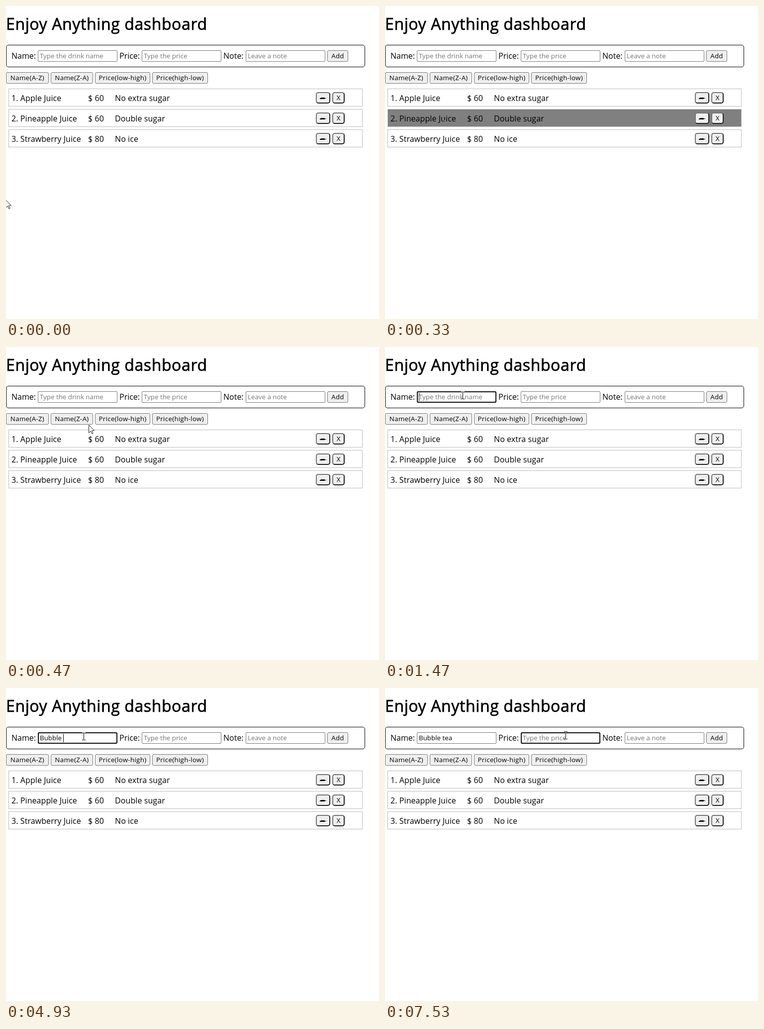
These frames come from a looping animation (750x629 px, 8000 ms). An HTML page:

```html
<!DOCTYPE html>
<html lang="en">
<head>
<meta charset="utf-8">
<title>Drinks list</title>
<style>
  * { box-sizing: border-box; }
  html, body { margin: 0; width: 100%; height: 100%; overflow: hidden; background: #fff; }
  body { position: relative; font: 16px/20px "Open Sans", "Noto Sans", sans-serif; color: #000; cursor: none; }
  body * { position: absolute; white-space: pre; }
  h1 { left: 0; top: 16px; margin: 0; font-size: 32px; line-height: 40px; font-weight: 400; letter-spacing: .6px; -webkit-text-stroke: .7px #000; }
  .form { left: 0; top: 78px; width: 722px; height: 45px; border: 1px solid #000; border-radius: 5px; }
  .label { top: 90px; }
  .field, .btn { height: 23px; font-size: 13.333px; line-height: 21px; border: 1px solid #767676; }
  .field { top: 89px; width: 160px; padding-left: 3px; border-radius: 2px; }
  .field.empty { color: #757575; }
  .field.focus::after { content: ""; position: absolute; inset: -1px; border: 2px solid #101010; border-radius: 3px; }
  .btn { background: #efefef; border-radius: 3px; text-align: center; letter-spacing: .3px; }
  .sort { top: 133px; }
  .row { left: 5px; width: 712px; height: 36px; border: 1px solid #bbb; }
  .row.hover { background: #808080; }
  .row span { top: 8px; letter-spacing: .08px; }
  .row .btn { top: 6px; line-height: 19px; border: 2px solid; border-color: #767676 #212121 #212121 #767676; border-radius: 5px; letter-spacing: 0; }
  .row svg { left: 6px; top: 7px; }
  #caret { top: 92px; width: 1px; height: 17px; background: #000; }
  #arrow, #beam { left: 0; top: 0; overflow: visible; }
  #beam { mix-blend-mode: difference; }
</style>
</head>
<body>
<h1>Enjoy Anything dashboard</h1>
<div class="form"></div>
<span class="label" style="left:11px">Name:</span>
<div class="field" id="name" style="left:64px"></div>
<span class="label" style="left:228px">Price:</span>
<div class="field empty" id="price" style="left:273px">Type the price</div>
<span class="label" style="left:437px">Note:</span>
<div class="field empty" style="left:482px">Leave a note</div>
<div class="btn" style="left:646px;top:89px;width:42px">Add</div>
<div class="btn sort" style="left:0;width:86px">Name(A-Z)</div>
<div class="btn sort" style="left:90px;width:85px">Name(Z-A)</div>
<div class="btn sort" style="left:179px;width:111px">Price(low-high)</div>
<div class="btn sort" style="left:294px;width:112px">Price(high-low)</div>
<div id="caret"></div>
<svg id="arrow" width="13" height="20">
  <path d="M.5 .8V16.5L4.3 13L6.8 18.6L9 17.6L6.6 12H11.6Z" fill="#fff" stroke="#1c1c2c"/>
</svg>
<svg id="beam" width="7" height="16" shape-rendering="crispEdges">
  <path d="M0 0h3v1H0zM4 0h3v1H4zM3 1h1v14H3zM0 15h3v1H0zM4 15h3v1H4z" fill="#fff"/>
</svg>
<script>
const LOOP = 8000, FPS = 15, BLINK = 8;   // BLINK and all times below are in ticks of 1/FPS s
const $ = id => document.getElementById(id);
const name = $('name'), price = $('price'), caret = $('caret'), arrow = $('arrow'), beam = $('beam');

const drinks = [
  ['Apple Juice', 60, 'No extra sugar'],
  ['Pineapple Juice', 60, 'Double sugar'],
  ['Strawberry Juice', 80, 'No ice']
];
const rows = drinks.map(([drink, cost, note], i) => {
  const row = document.createElement('div');
  row.className = 'row';
  row.style.top = 166 + 41 * i + 'px';
  row.innerHTML = `<span style="left:5px">${i + 1}. ${drink}</span>
    <span style="left:159px">$ ${cost}</span><span style="left:213px">${note}</span>
    <div class="btn" style="left:617px;width:29px"><svg width="14" height="7" shape-rendering="crispEdges">
      <path d="M0 3h2v2H0zM2 2h8v3H2zM10 3h3v1h-3z" fill="#160a18"/></svg></div>
    <div class="btn" style="left:650px;width:25px">X</div>`;
  document.body.insertBefore(row, caret);
  return row;
});

// Pointer moves in straight lines between [x, y] points, from one tick to another
const moves = [
  { from: 0, to: 7, a: [-1, 389], b: [166, 156] },
  { from: 7, to: 11, a: [166, 156], b: [156, 97] },
  { from: 92, to: 96, a: [156, 97], b: [507, 49] },
  { from: 96, to: 98, a: [507, 49], b: [392, 90] },
  { from: 101, to: 105, a: [392, 90], b: [363, 95] }
];
const over = (el, x, y) => {
  const r = el.getBoundingClientRect();
  return x >= r.left && x < r.right && y >= r.top && y < r.bottom;
};
const texts = [...document.querySelectorAll('h1, .label, .field, .row span')];

function pointer(tick) {
  const { from, to, a, b } = moves.findLast(m => m.from <= tick);
  const p = Math.min(1, (tick - from) / (to - from));
  const [x, y] = a.map((v, i) => Math.round(v + (b[i] - v) * p));
  const isBeam = texts.some(el => over(el, x, y));
  arrow.style.display = isBeam ? 'none' : '';
  beam.style.display = isBeam ? '' : 'none';
  arrow.style.transform = `translate(${x}px,${y}px)`;
  beam.style.transform = `translate(${x - 3}px,${y - 8}px)`;
  rows.forEach(row => row.classList.toggle('hover', over(row, x, y)));
}

const text = 'Bubble tea', hint = 'Type the drink name';
const keys = [37, 42, 50, 52, 65, 67, 74, 79, 85, 88];
const NAME_CLICK = 22, PRICE_CLICK = 105;

const pen = document.createElement('canvas').getContext('2d');
pen.font = '13.333px "Open Sans", "Noto Sans", sans-serif';
const caretX = typed => 68 + Math.floor(pen.measureText(typed).width);

function form(tick) {
  const n = keys.filter(k => k <= tick).length, typed = text.slice(0, n);
  const onPrice = tick >= PRICE_CLICK, onName = tick >= NAME_CLICK && !onPrice;
  name.textContent = typed || hint;
  name.classList.toggle('empty', !n);
  name.classList.toggle('focus', onName);
  price.classList.toggle('focus', onPrice);

  // The blink restarts at each click or key
  const last = onPrice ? PRICE_CLICK : n ? keys[n - 1] : NAME_CLICK;
  const lit = Math.floor((tick - last) / BLINK) % 2 === 0;
  caret.style.display = (onName || onPrice) && lit ? '' : 'none';
  caret.style.left = (onPrice ? 277 : caretX(typed)) + 'px';
}

let start;
function draw(now) {
  start ??= now;
  const tick = Math.floor((now - start) % LOOP * FPS / 1000 + .1);
  pointer(tick);
  form(tick);
  requestAnimationFrame(draw);
}
requestAnimationFrame(draw);
</script>
</body>
</html>
```
